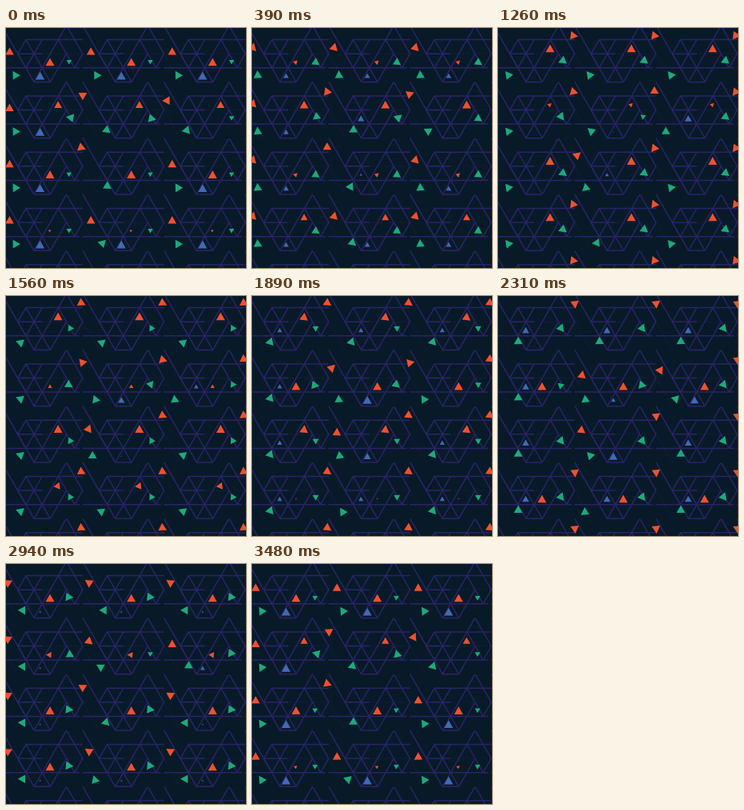
These frames come from a looping animation (300 by 300 pixels, 3.51 s). An HTML page:

```html
<!DOCTYPE html>
<html lang="en">
<head>
<meta charset="utf-8">
<title>Triangle lattice</title>
<style>
html, body { margin: 0; width: 100%; height: 100%; overflow: hidden; background: #081a28; }
svg { display: block; width: 100%; height: 100%; }
</style>
</head>
<body>
<svg viewBox="0 0 300 300">
  <defs>
    <g id="tile" fill="none" stroke="#2a2367" stroke-width="1.5" stroke-linejoin="round">
      <path d="M24.9 14.6H96M14.7 32.2H45M-6 49.8H92M35 67.4H55.3"/>
      <path d="M-5.6 -2.9L35 67.4L74.4 -1Q75.6 -2.9 76.8 -1L95.9 32.2L85.8 49.8L65.5 14.6"/>
      <path d="M55.3 67.4L24.9 14.6L14.7 32.2L24.9 49.8L45.2 14.6M55.3 67.4L75.6 32.2"/>
      <path d="M45 32.2H95.9L116.2 67.4" stroke-width=".8" stroke-dasharray="1 2"/>
    </g>
  </defs>
  <g id="grid"></g>
  <g id="shapes" transform="translate(-.4 -.6)"></g>
</svg>
<script>
const NS = 'http://www.w3.org/2000/svg';
const LOOP = 3510, HALF = LOOP / 2, STEP = 30;
const DX = 101.6, DY = 70.3;
const RED = '#f1502f', GREEN = '#1bab7c', BLUE = '#406ab8';

const { PI, sin, cos, min, max, abs } = Math;
const mod = (v, n) => ((v % n) + n) % n;
const wave = t => (1 + cos(2 * PI * t / LOOP)) / 2;

// Cells that run ahead of the rest, in ms, keyed by row and column
const ahead = {
  '1,0': { spin: 1000 },
  '1,1': { slide: 880, spin: 540, roll: 2050, pulse: 1640 },
  '1,2': { slide: 570, roll: 2810, pulse: 1000 },
  '2,1': { slide: 1460, roll: 2510, pulse: 1350 },
  '3,1': { roll: 1610 }
};
const hopStart = [545, 3160, 545, 85, 545];

// Each motion returns x, y, rotation and scale inside its cell
const motions = {
  slide(t, lead) {
    const f = wave(t + 80) ** 2, w = wave(t);
    const back = mod(t, LOOP) > HALF && !lead ? 240 : -120;
    return [-5.9 + 10.9 * f, 10 + 19.7 * f, back > 0 ? 120 + back * w : 120 * (1 - w), 1];
  },

  hop(t, lead, row) {
    const p = mod(t - hopStart[row], LOOP), q = p % HALF;
    const [x, y] = p < HALF ? [65.5, 26] : [55.4, 43];
    const grow = sin(min(q / 500, 1) * PI / 2);
    const end = max(0, 1 - (HALF - q) / 500);
    return [x, y, 80 * end ** 1.5, grow * (1 - end * end) * 1.04];
  },

  spin(t) {
    const u = mod(t, LOOP) / LOOP;
    const size = .6 + .4 * min(1, 1.4 * abs(sin(2 * PI * u)));
    return [80, 42, 60 - 360 * u - 48 * sin(PI * u), size];
  },

  roll(t) {
    const f = 1 - wave(t - 590);
    return [6.9 + 17.4 * f, 58.4, -120 * f, 1];
  },

  pulse(t) {
    const low = bell(t, 2850, 1320), high = bell(t, 1600, 1220);
    return low > 0 ? [43, 60.2, 0, low * 1.04] : [35, 43.2, 0, high * .85];
  }
};

const kinds = { slide: RED, hop: RED, spin: GREEN, roll: GREEN, pulse: BLUE };

function bell(t, start, len) {
  const u = mod(t - start, LOOP) / len;
  return u < 1 ? sin(PI * u) : 0;
}

function add(parent, name, attrs) {
  const el = document.createElementNS(NS, name);
  for (const k in attrs) el.setAttribute(k, attrs[k]);
  return parent.appendChild(el);
}

const grid = document.getElementById('grid');
const layer = document.getElementById('shapes');
const shapes = [];

for (let r = -1; r < 5; r++)
  for (let c = -1; c < 4; c++) {
    add(grid, 'use', { href: '#tile', x: c * DX, y: r * DY });
    if (r < 0 || c < 0) continue;
    const leads = ahead[r + ',' + c] || {};
    for (const kind in kinds) {
      const el = add(layer, 'path', { d: 'M0 -4.7L5.3 4.7H-5.3Z', fill: kinds[kind] });
      shapes.push({ move: motions[kind], lead: leads[kind] || 0, r, c, el });
    }
  }

function draw(t) {
  for (const { move, lead, r, c, el } of shapes) {
    const [x, y, rot, size] = move(t + lead, lead, r);
    el.setAttribute('transform',
      `translate(${x + c * DX} ${y + r * DY}) rotate(${rot}) scale(${size})`);
  }
}

const begin = performance.now();
function tick() {
  const t = (performance.now() - begin) % LOOP;
  draw(Math.floor(t / STEP) * STEP);
  requestAnimationFrame(tick);
}
draw(0);
requestAnimationFrame(tick);
</script>
</body>
</html>
```
